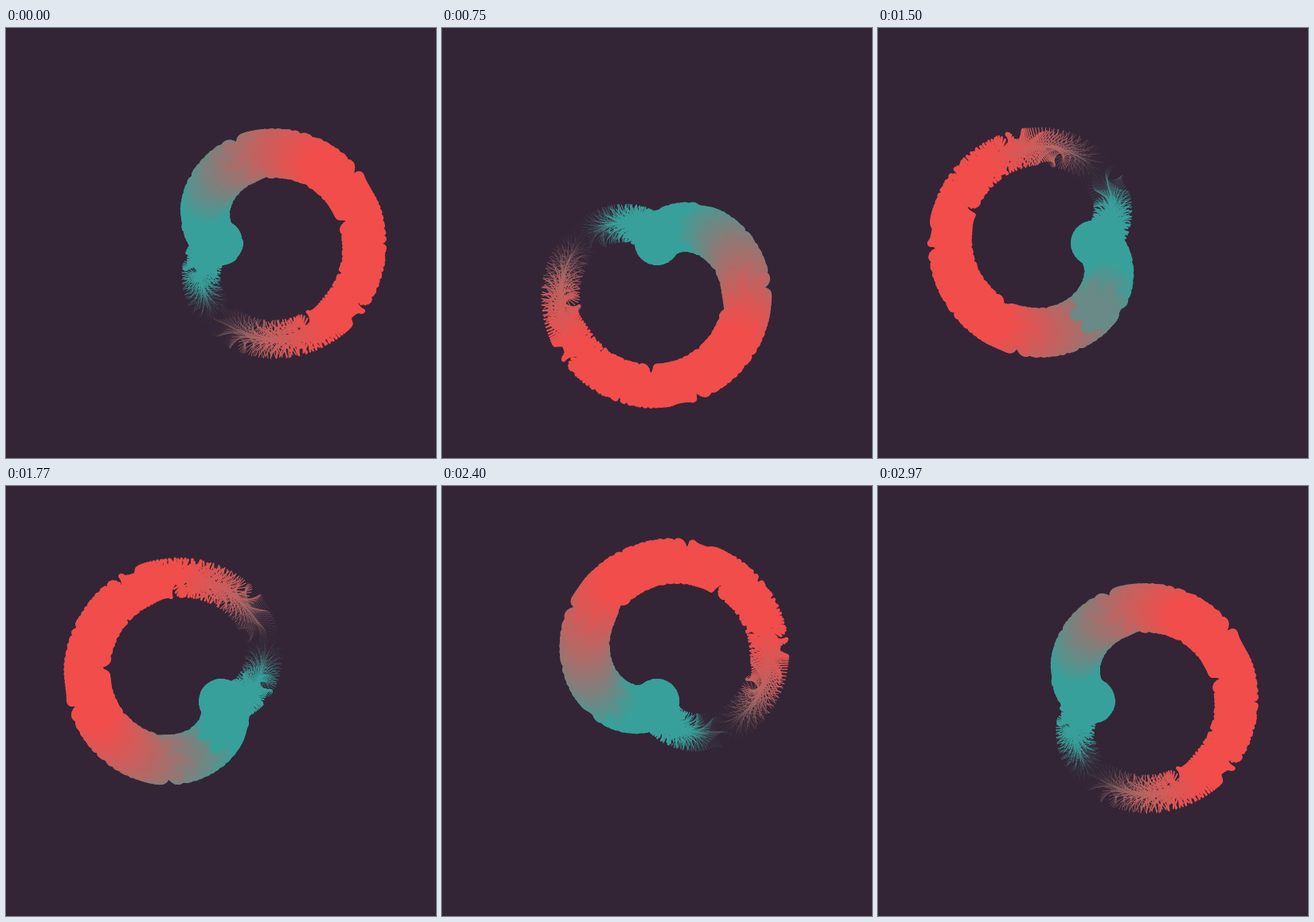
An HTML page with a canvas for the animation above (3000 ms loop, 540 by 540 pixels).

```html
<!DOCTYPE html>
<html>
<head>
<meta charset="utf-8">
<title>Twisting ring</title>
<style>
  html, body { margin: 0; width: 100%; height: 100%; overflow: hidden; background: #332536; }
  canvas { display: block; }
</style>
</head>
<body>
<canvas id="stage" width="540" height="540"></canvas>
<script>
const ctx = document.getElementById('stage').getContext('2d');
const TAU = Math.PI * 2;
const RAD = Math.PI / 180;
const ARMS = 7;
const SECTOR = 360 / ARMS;
const TWIST_AT = 33;        // where the stars momentarily stop turning
const TWIST_ANGLE = 49;
const ARM = 24;             // arm length without its round cap
const TEAL = [56, 160, 155];
const RED = [241, 77, 75];
const start = performance.now();

function mix(k) {
  k = Math.min(1, Math.max(0, k));
  return `rgb(${TEAL.map((c, i) => Math.round(c + (RED[i] - c) * k))})`;
}

// Each star turns one degree per step faster than the one before.
function starAngle(deg) {
  const x = deg - TWIST_AT;
  const off = x - SECTOR * Math.round(x / SECTOR);
  return (TWIST_ANGLE + off * off / 2) * RAD;
}

function star(x, y, angle) {
  ctx.beginPath();
  for (let k = 0; k < ARMS; k++) {
    const a = angle + k * TAU / ARMS;
    ctx.moveTo(x, y);
    ctx.lineTo(x + ARM * Math.cos(a), y + ARM * Math.sin(a));
  }
  ctx.stroke();
}

function draw(turn) {
  ctx.fillStyle = '#332536';
  ctx.fillRect(0, 0, 540, 540);
  ctx.lineCap = 'round';
  for (let deg = 90; deg < 450; deg++) {
    const a = deg * RAD;
    const phase = a - turn;
    const width = 8 * (1 - Math.sin(phase));
    if (width < 0.01) continue;
    const r = 90 * (1 + Math.cos(phase));   // cardioid
    ctx.strokeStyle = mix((r - 55) / 105);
    ctx.lineWidth = width;
    star(270 + r * Math.cos(a), 270 + r * Math.sin(a), starAngle(deg));
  }
}

function tick() {
  const t = (performance.now() - start) % 3000;
  draw((Math.floor(t / 30) + 1) / 100 * TAU);
  requestAnimationFrame(tick);
}
tick();
</script>
</body>
</html>
```
